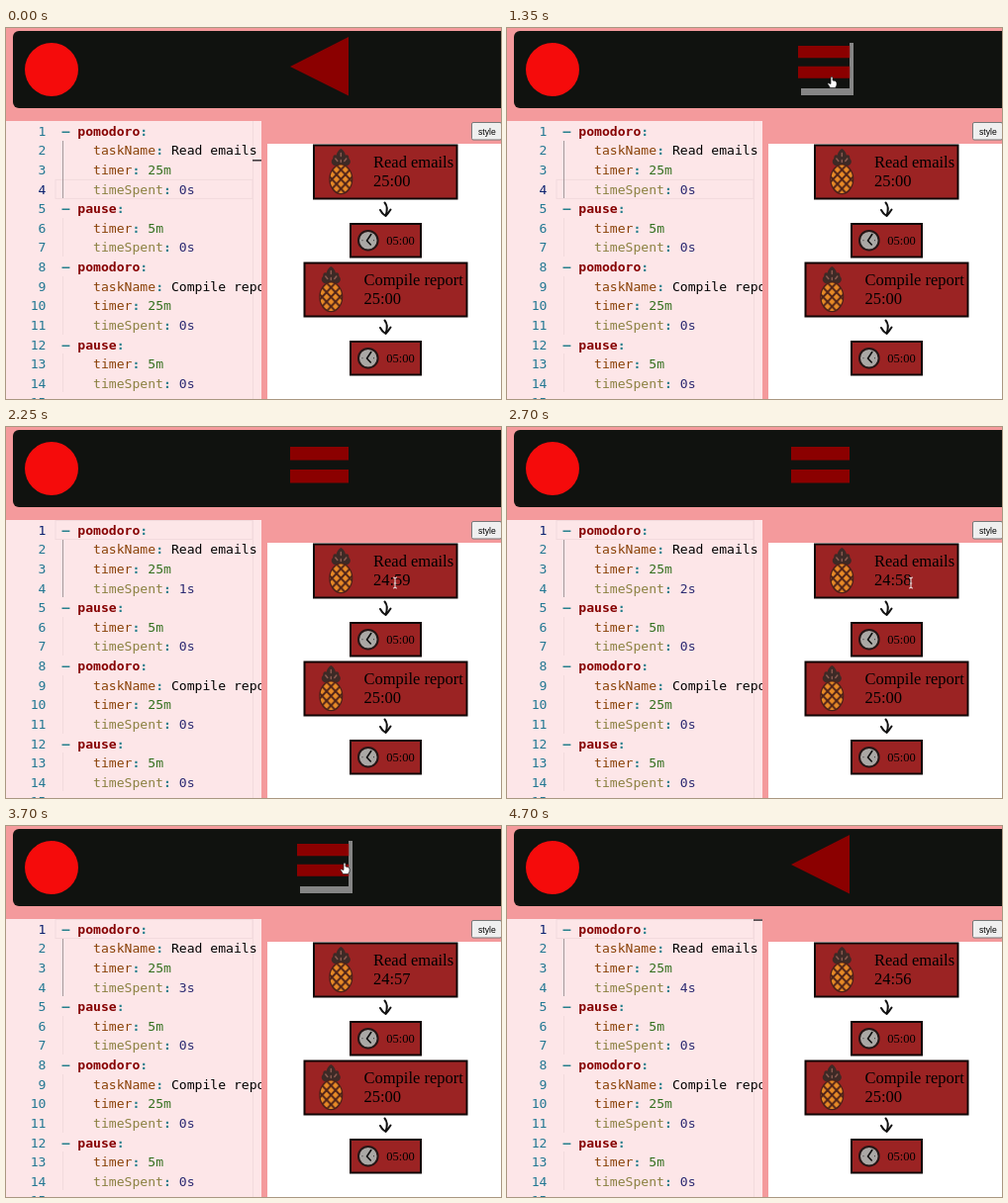
An HTML page for the animation above (4.75 s loop, 500x375 px).

```html
<!DOCTYPE html>
<html lang="en">
<head>
<meta charset="utf-8">
<style>
  html, body { margin: 0; width: 100%; height: 100%; overflow: hidden; background: #f49a9c; }
  svg { display: block; width: 500px; height: 375px; }
  text { white-space: pre; }
  .code { font: 13.1px "DejaVu Sans Mono", monospace; }
  .num { fill: #237893; text-anchor: end; }
  .num.active { fill: #0b216f; }
  .dash, .colon { fill: #257f8c; font-weight: bold; }
  .head { fill: #860000; font-weight: bold; }
  .key { fill: #8a4208; }
  .spent { fill: #8b8040; }
  .time { fill: #34701f; }
  .count { fill: #2d2b72; }
  .faint { fill: none; stroke: #f2dadd; }
  .card { fill: #9b2323; stroke: #100606; stroke-width: 2; }
  .task { font: 16.5px "Liberation Serif", serif; }
  .small { font: 12.5px "Liberation Serif", serif; }
  .ink { fill: none; stroke: #111; stroke-width: 2; stroke-linecap: round; stroke-linejoin: round; }
</style>
</head>
<body>
<svg viewBox="0 0 500 375">
  <defs>
    <clipPath id="editorClip"><rect y="94" width="258" height="281"/></clipPath>
    <clipPath id="fruitClip"><ellipse cy="30.3" rx="10.8" ry="14.2"/></clipPath>
    <pattern id="scales" width="9" height="9.6" patternUnits="userSpaceOnUse" x="-4.5" y="16">
      <rect width="9" height="9.6" fill="#e88a26"/>
      <path d="M-1-1.07L10 10.67M-1 10.67L10-1.07" stroke="#4b2018" stroke-width="1.9"/>
    </pattern>
    <g id="pineapple">
      <path d="M-6 17Q-12 14-8 9Q-8 5-4.5 6Q-4 2 0-.5Q4 2 4.5 6Q8 5 8 9Q12 14 6 17Q0 14-6 17Z" fill="#3d2a26"/>
      <path d="M0 4V7M-5.5 9.5L-3.5 12M5.5 9.5L3.5 12M0 11V13" stroke="#8a5a50" stroke-width="1.5" stroke-linecap="round"/>
      <ellipse cy="30.3" rx="12" ry="15.4" fill="#4b2018"/>
      <rect x="-12" y="15" width="24" height="31" fill="url(#scales)" clip-path="url(#fruitClip)"/>
    </g>
    <g id="pauseCard">
      <rect class="card" x="348" y="198" width="71" height="33.5"/>
      <circle cx="365.8" cy="214.7" r="9.8" fill="#aaa8a5" stroke="#251616" stroke-width="2"/>
      <path d="M368.8 208.5L364.5 215L368.3 219" class="ink" style="stroke-width:1.6"/>
      <path d="M359.5 214.7h1M371 214.7h1" stroke="#333"/>
      <text class="small" x="384.3" y="219">05:00</text>
      <path class="ink" d="M382.5 176.5Q386.5 181 383.5 189.5M378 184Q380 188 383.5 190Q386 187.5 388.5 183.5"/>
    </g>
  </defs>

  <rect x="7" y="3" width="510" height="78" rx="6" fill="#10120f"/>
  <circle cx="46" cy="42" r="27" fill="#f50b0b"/>

  <rect id="shadow" x="297" y="15" width="53" height="53" fill="#858585"/>
  <rect id="face" x="293" y="8" width="53" height="53" fill="#10120f"/>
  <g id="button" fill="#8b0000">
    <path id="play" d="M287 39L346 9V68.5Z"/>
    <path id="pause" d="M287 20h59v13.5h-59zM287 43h59v13.5h-59z"/>
  </g>

  <g clip-path="url(#editorClip)">
    <rect y="94" width="258" height="281" fill="#fde6e8"/>
    <path class="faint" d="M57.5 192V231M57.5 251V310M57.5 329V368M249.5 94V375"/>
    <rect id="current" class="faint" x="50" width="199" height="19"/>
    <path d="M57.5 114V172" stroke="#a39a9c"/>
    <g id="code" class="code"></g>
    <rect id="mark" x="249" width="9" height="1.6" fill="#453d40"/>
  </g>

  <rect x="264" y="117" width="236" height="258" fill="#fff"/>
  <rect x="470.5" y="95.5" width="30" height="17.5" rx="1.5" fill="#efefef" stroke="#777"/>
  <text x="477" y="107.5" style="font:8.6px 'Liberation Sans',sans-serif">style</text>

  <rect class="card" x="311" y="118.5" width="144.5" height="54"/>
  <use href="#pineapple" x="338.3" y="122.5"/>
  <rect id="selection" x="371" y="146" height="19" fill="#8078b0"/>
  <text class="task" x="371" y="141">Read emails</text>
  <text class="task" x="371" y="160" id="clock"></text>
  <use href="#pauseCard"/>
  <rect class="card" x="301.5" y="237.5" width="164" height="54"/>
  <use href="#pineapple" x="328.3" y="241.5"/>
  <text class="task" x="361.5" y="260">Compile report</text>
  <text class="task" x="361.5" y="279">25:00</text>
  <use href="#pauseCard" y="119"/>

  <g id="cursor" stroke-linejoin="round">
    <path id="arrow" d="M0 0V10L2.4 7.8L4 11.3L5.6 10.6L4 7.2H7Z" fill="#111" stroke="#fff" stroke-width=".9"/>
    <path id="hand" d="M-1 1Q0-1 1 1V4Q4 4 5 6V9L3.5 11.5H-1.5L-4 7.5Q-4 6-1 7.5Z" fill="#fff" stroke="#222" stroke-width=".7"/>
    <path id="beam" d="M-2-5Q0-5 0-3.5Q0-5 2-5M0-4V5M-2 6Q0 6 0 4.5Q0 6 2 6M-1.2 1H1.2" fill="none" stroke="#e8dada" stroke-width="1.1"/>
  </g>
</svg>
<script>
  const LOOP = 4750, START = 500, STOP = 4430, ROW = 19.62;
  const TICKS = [1450, 2450, 3450, 4400];
  const $ = id => document.getElementById(id);
  const show = (id, on) => $(id).style.display = on ? '' : 'none';
  const span = (cls, s) => `<tspan class="${cls}">${s}</tspan>`;

  // Editor text: two tasks, each followed by a pause
  const head = name => span('dash', '– ') + span('head', name) + span('colon', ':');
  const field = (cls, name, valueCls, value) =>
    '    ' + span(cls, name) + span('colon', ': ') + span(valueCls, value);
  const timing = time => [
    field('key', 'timer', 'time', time),
    field('spent', 'timeSpent', 'count', '0s')
  ];
  const block = task => [
    head('pomodoro'), field('key', 'taskName', '', task), ...timing('25m'),
    head('pause'), ...timing('5m')
  ];
  const lines = [...block('Read emails'), ...block('Compile report'), ''];
  $('code').innerHTML = lines.map((line, i) => {
    const y = 108.7 + i * ROW;
    return `<text class="num" x="40.5" y="${y}">${i + 1}</text><text x="56.5" y="${y}">${line}</text>`;
  }).join('');
  const numbers = document.querySelectorAll('.num');
  const spent = document.querySelector('.count');

  // Pointer path: time, x, y
  const path = [
    [250, 386, 72], [400, 358, 48], [500, 337, 47], [1350, 328, 49], [1600, 330, 50],
    [2050, 388, 150], [2250, 393, 157], [2650, 408, 157], [2800, 408, 157],
    [3100, 371, 156], [3300, 369, 152], [3450, 362, 120], [3620, 342, 42],
    [3700, 342, 37], [4450, 341, 38], [4600, 346, -14]
  ];
  function pointer(t) {
    const i = path.findIndex(p => p[0] > t);
    if (i < 1) return null;
    const [t0, x0, y0] = path[i - 1], [t1, x1, y1] = path[i];
    const u = (t - t0) / (t1 - t0), e = u * u * (3 - 2 * u);
    return [x0 + (x1 - x0) * e, y0 + (y1 - y0) * e];
  }

  function draw(t) {
    const seconds = TICKS.filter(tick => t >= tick).length;
    const running = t >= START && t < STOP;
    const activeRow = seconds ? 0 : 3;
    const p = pointer(t);
    const hover = !!p && p[0] > 287 && p[0] < 346 && p[1] > 9 && p[1] < 68;

    spent.textContent = seconds + 's';
    $('clock').textContent = seconds ? '24:' + (60 - seconds) : '25:00';
    numbers.forEach((n, i) => n.classList.toggle('active', i === activeRow));
    $('current').setAttribute('y', 94.5 + activeRow * ROW);
    show('mark', !running);
    $('mark').setAttribute('y', seconds ? 94.3 : 133);

    show('play', !running);
    show('pause', running);
    show('shadow', hover);
    show('face', hover);
    $('button').setAttribute('transform', hover ? 'translate(40 0) scale(.885 .9)' : '');

    const selecting = t >= 2800 && t < TICKS[2];
    show('selection', selecting);
    const left = selecting && t < 3100 ? Math.max(371, p[0]) : 371;
    $('selection').setAttribute('x', left);
    $('selection').setAttribute('width', 408.5 - left);

    show('cursor', p);
    if (!p) return;
    const beam = !hover && p[0] > 370 && p[0] < 453 && p[1] > 127 && p[1] < 166;
    show('hand', hover);
    show('beam', beam);
    show('arrow', !hover && !beam);
    $('cursor').setAttribute('transform', `translate(${p})`);
  }

  function tick() {
    draw(performance.now() % LOOP);
    requestAnimationFrame(tick);
  }
  tick();
</script>
</body>
</html>
```
